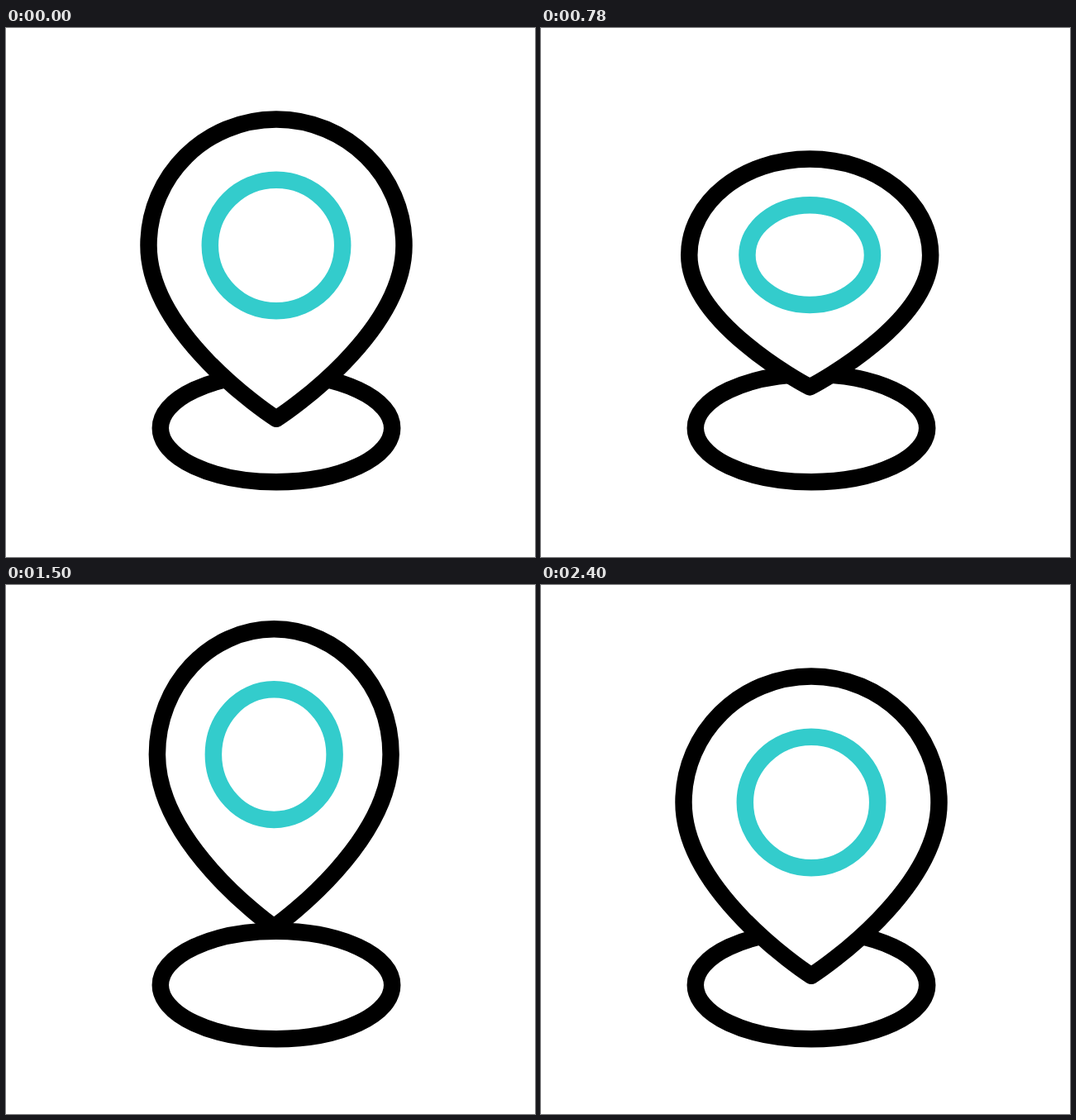
These frames come from a looping animation (640 px wide and 640 px high, 2420 ms). An HTML page:

```html
<!DOCTYPE html>
<html lang="en">
<head>
<meta charset="utf-8">
<title>Bouncing map pin</title>
<style>
  html, body { margin: 0; width: 100%; height: 100%; overflow: hidden; background: #fff; }
  svg { display: block; width: 100%; height: 100%; }
  svg * { stroke-width: 20.5; stroke-linejoin: round; }
</style>
</head>
<body>
<svg viewBox="0 0 640 640">
  <ellipse cx="327" cy="484" rx="140.2" ry="65.2" fill="none" stroke="#000"/>
  <path id="pin" fill="#fff" stroke="#000"/>
  <path id="ring" fill="none" stroke="#3cc"/>
</svg>
<script>
const LOOP = 2420;
const K = 0.5523;
const TIP = 472.7;
const MID = 263;

const smooth = [1 / 3, 0, 2 / 3, 1];
const launch = [0.15, 0.79, 2 / 3, 1];
const drop = [1 / 3, 0, 0.85, 0.2];

// time, tip x, tip y, x scale, y scale, tilt in degrees, easing towards the next key
const keys = [
  [0,    327,   TIP,        1,     1,     0,  smooth],
  [640,  327,   TIP,        1,     0.61,  0,  smooth],
  [720,  327,   TIP,        1,     0.61,  0,  launch],
  [1200, 322.5, TIP - 96.2, 0.861, 0.992, 0,  drop],
  [1600, 327,   TIP,        1,     1,     0,  smooth],
  [1760, 327,   TIP,        1,     1,     8,  smooth],
  [1920, 327,   TIP,        1,     1,     -6, smooth],
  [2080, 327,   TIP,        1,     1,     4,  smooth],
  [2240, 327,   TIP,        1,     1,     -2, smooth],
  [2400, 327,   TIP,        1,     1,     0,  smooth],
  [LOOP, 327,   TIP,        1,     1,     0,  smooth]
];

const cubic = (a, b, s) => 3 * (1 - s) ** 2 * s * a + 3 * (1 - s) * s * s * b + s ** 3;

function ease([x1, y1, x2, y2], u) {
  let lo = 0, hi = 1;
  for (let i = 0; i < 24; i++) {
    const s = (lo + hi) / 2;
    if (cubic(x1, x2, s) < u) lo = s; else hi = s;
  }
  return cubic(y1, y2, lo);
}

function poseAt(t) {
  let i = 0;
  while (i < keys.length - 2 && t >= keys[i + 1][0]) i++;
  const a = keys[i], b = keys[i + 1];
  const p = ease(a[6], (t - a[0]) / (b[0] - a[0]));
  return [1, 2, 3, 4, 5].map(n => a[n] + (b[n] - a[n]) * p);
}

const pin = document.getElementById("pin");
const ring = document.getElementById("ring");

function draw(t) {
  const [x0, y0, sx, sy, tilt] = poseAt(t);
  const cos = Math.cos(tilt * Math.PI / 180);
  const sin = Math.sin(tilt * Math.PI / 180);

  // Points are scaled and turned about the tip; the stroke keeps its width
  const at = (x, y) => {
    const dx = x * sx, dy = (y - TIP) * sy;
    return `${(x0 + dx * cos - dy * sin).toFixed(2)} ${(y0 + dx * sin + dy * cos).toFixed(2)} `;
  };
  const arcTop = (rx, ry) =>
    "C" + at(-rx, MID - ry * K) + at(-rx * K, MID - ry) + at(0, MID - ry) +
    "C" + at(rx * K, MID - ry) + at(rx, MID - ry * K) + at(rx, MID);

  pin.setAttribute("d",
    "M" + at(0, TIP) +
    "C" + at(-12, TIP - 7.5) + at(-154.5, 369) + at(-154.5, MID) +
    arcTop(154.5, 152.5) +
    "C" + at(154.5, 369) + at(12, TIP - 7.5) + at(0, TIP) + "Z");

  const rx = 80.2, ry = 79.2;
  ring.setAttribute("d",
    "M" + at(-rx, MID) + arcTop(rx, ry) +
    "C" + at(rx, MID + ry * K) + at(rx * K, MID + ry) + at(0, MID + ry) +
    "C" + at(-rx * K, MID + ry) + at(-rx, MID + ry * K) + at(-rx, MID) + "Z");
}

let start;
function tick(now) {
  start ??= now;
  draw((now - start) % LOOP);
  requestAnimationFrame(tick);
}
draw(0);
requestAnimationFrame(tick);
</script>
</body>
</html>
```
